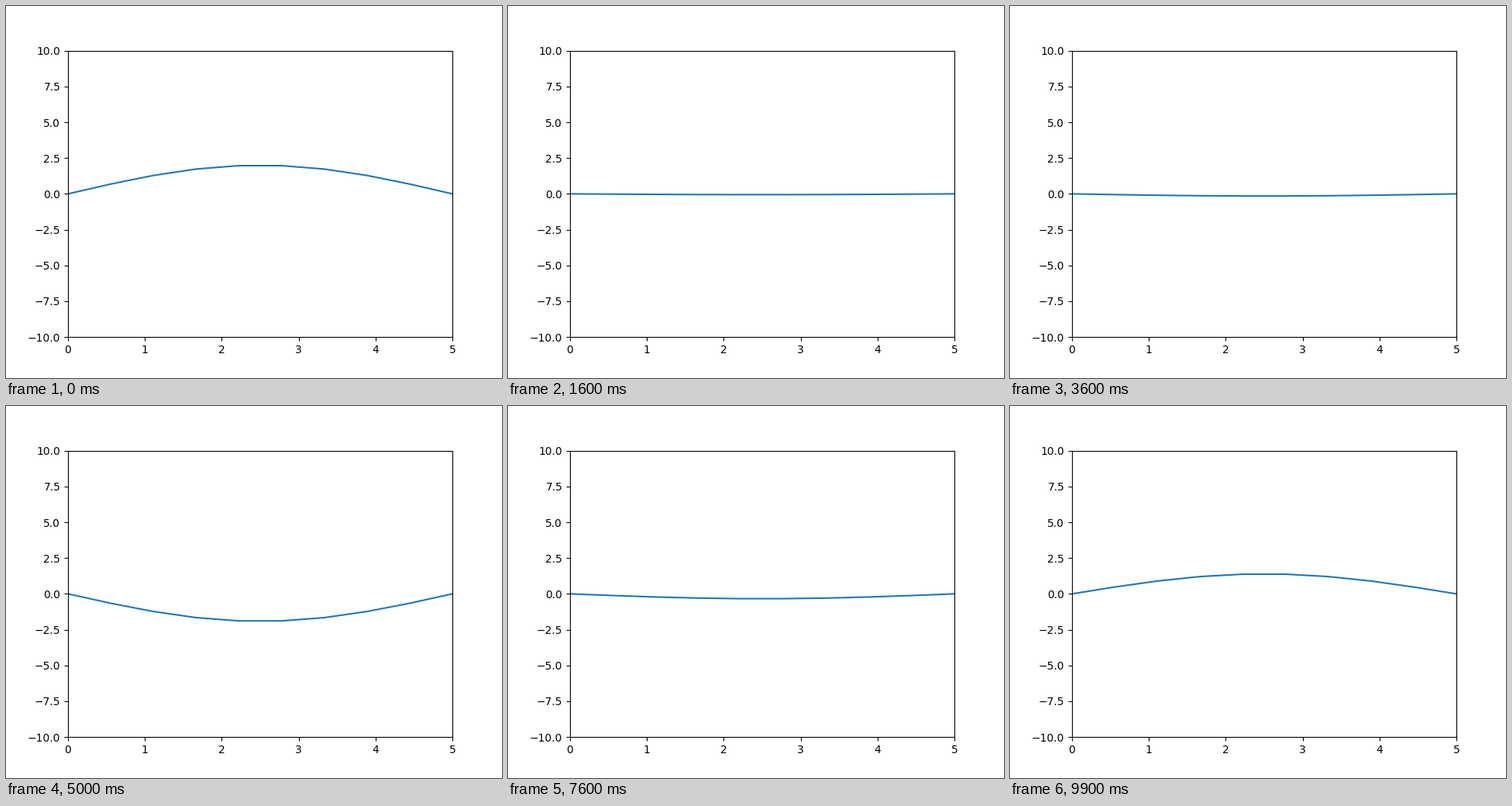
Animation, 640 px wide and 480 px high, one loop 10 s. Source, as a matplotlib script:

```python
import numpy as np
import matplotlib.pyplot as plt
from matplotlib.animation import FuncAnimation

LENGTH = 5
POINTS = 10
FRAMES = 100
COUPLING = 0.8  # squared Courant number of the string

x = np.linspace(0, LENGTH, POINTS)
shape = np.sin(np.pi * x / LENGTH)

# Fundamental mode of the discretised string, in radians per step
omega = 2 * np.arcsin(np.sqrt(COUPLING) * np.sin(np.pi / (2 * (POINTS - 1))))
phase = np.arctan(2 * np.tan(omega / 2))
peak = 2 / np.cos(phase)

fig, ax = plt.subplots(figsize=(6.4, 4.8), dpi=100)
ax.set_xlim(0, LENGTH)
ax.set_ylim(-10, 10)
line, = ax.plot(x, 2 * shape)


def update(step):
    line.set_ydata(peak * np.cos(omega * step - phase) * shape)
    return line,


anim = FuncAnimation(fig, update, frames=FRAMES, interval=100,
                     repeat=True, repeat_delay=0)
plt.show()
```
